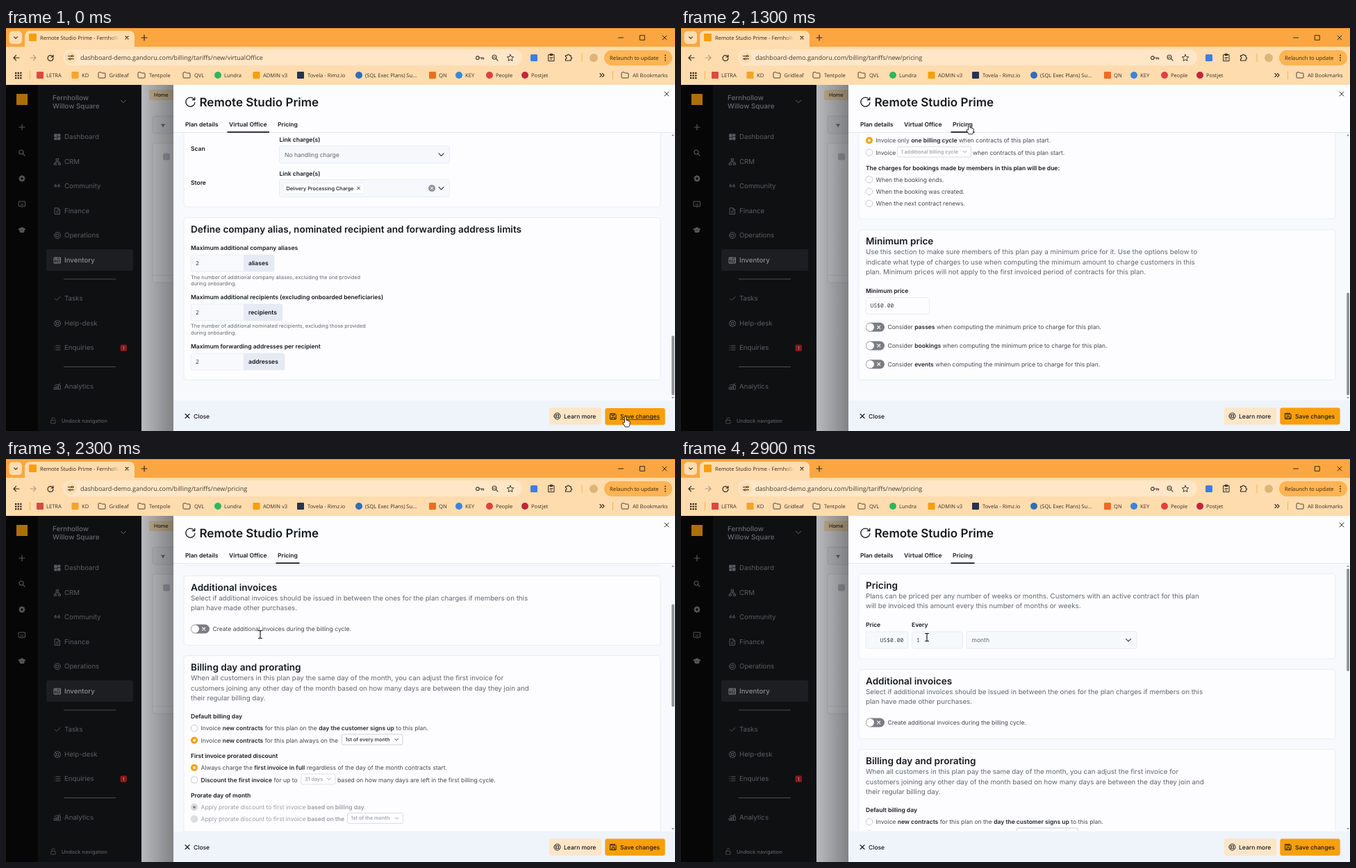
These frames come from a looping animation (963x581 px, 3000 ms). An HTML page with a canvas:

```html
<!DOCTYPE html>
<html lang="en">
<head>
<meta charset="utf-8">
<title>Remote Studio Prime</title>
<style>
html, body { margin: 0; width: 100%; height: 100%; overflow: hidden; }
canvas { display: block; width: 963px; height: 581px; }
</style>
</head>
<body>
<canvas id="stage" width="963" height="581"></canvas>
<script>
const ctx = document.getElementById('stage').getContext('2d');
ctx.textRendering = 'geometricPrecision';
const LOOP = 3000, STEP = 100, MAX_SCROLL = 588;
const UI = 'Inter, sans-serif', CHROME = '"Open Sans", sans-serif', MONO = '"Noto Sans Mono", monospace';
const INK = '#17191e', BODY = '#45474d', SOFT = '#63666d', FAINT = '#9b9da3', AMBER = '#f99e0c', EDGE = '#e6e9f0';
const PEACH = '#ffdcae', THUMB = '#909297';

// ---- drawing helpers ----
function rect(x, y, w, h, fill, r = 0, edge) {
  ctx.beginPath();
  ctx.roundRect(x, y, w, h, r);
  if (fill) { ctx.fillStyle = fill; ctx.fill(); }
  if (edge) { ctx.strokeStyle = edge; ctx.lineWidth = 0.8; ctx.stroke(); }
}
function disc(x, y, r, fill, edge, width = 1) {
  ctx.beginPath();
  ctx.arc(x, y, r, 0, 7);
  if (fill) { ctx.fillStyle = fill; ctx.fill(); }
  if (edge) { ctx.strokeStyle = edge; ctx.lineWidth = width; ctx.stroke(); }
}
function icon(path, x, y, color, width = 1, fill) {
  const p = new Path2D(path);
  ctx.save();
  ctx.translate(x, y);
  ctx.lineCap = ctx.lineJoin = 'round';
  if (fill) { ctx.fillStyle = fill; ctx.fill(p); }
  if (color) { ctx.strokeStyle = color; ctx.lineWidth = width; ctx.stroke(p); }
  ctx.restore();
}
// y is the middle of the capitals
function text(s, x, y, size = 8.53, color = INK, weight = 400, font = UI) {
  ctx.font = `${weight} ${size}px ${font}`;
  ctx.fillStyle = color;
  ctx.fillText(s, x, y + size * 0.36);
  return x + ctx.measureText(s).width;
}
// *starred* parts are bold
function rich(s, x, y, color = BODY) {
  s.split('*').forEach((part, i) => {
    x = text(part, x, y, 8.53, i % 2 && color === BODY ? '#24262b' : color, i % 2 ? 600 : 400);
  });
}
const lines = (rows, y, size = 9.74, gap = 14.6) => rows.forEach((s, i) => text(s, 266, y + i * gap, size, SOFT));
const heading = (s, y) => text(s, 266, y, 13.55, INK, 600);
const label = (s, y, x = 266) => text(s, x, y, 8.53, INK, 600);

const CROSS = 'M-3-3L3 3M3-3L-3 3', DOWN = 'M-3.5-1.7L0 1.8 3.5-1.7', SMALL_DOWN = 'M-2.3-1.1L0 1.2 2.3-1.1';
const SMALL_CROSS = 'M-2-2L2 2M2-2L-2 2', PLUS = 'M-4 0H4M0-4V4';
const FOLDER = 'M-5-3.2q0-1 1-1H-1L.2-3H4q1 0 1 1V3q0 1-1 1H-4q-1 0-1-1Z';
const RING = 'M-4.5 0a4.5 4.5 0 1 0 9 0a4.5 4.5 0 1 0-9 0M-2 0a2 2 0 1 0 4 0a2 2 0 1 0-4 0M-3.2-3.2L-1.5-1.5M3.2-3.2L1.5-1.5M-3.2 3.2L-1.5 1.5M3.2 3.2L1.5 1.5';
const SEARCH = 'M-4-1a3 3 0 1 0 6 0a3 3 0 1 0-6 0M1.2 1.2L4 4';

// ---- motion ----
function at(keys, t) {
  const i = keys.findLastIndex(k => k[0] <= t);
  const a = keys[i], b = keys[i + 1] || a;
  const f = b === a ? 0 : (t - a[0]) / (b[0] - a[0]);
  return a.slice(1).map((v, j) => typeof v === 'number' ? v + (b[j + 1] - v) * f : v);
}
const POINTER = [
  [0, 892, 560, 'hand'], [600, 889, 556, 'hand'], [700, 852, 518, 'arrow'], [900, 640, 318, 'arrow'],
  [1100, 438, 160, 'arrow'], [1200, 415, 138, 'hand'], [1400, 415, 138, 'hand'], [1500, 408, 145, 'arrow'],
  [1600, 398, 153, 'arrow'], [1800, 370, 192, 'arrow'], [1900, 360, 208, 'arrow'], [2000, 360, 208, 'arrow'],
  [2100, 364, 218, 'blocked'], [2200, 366, 253, 'beam'], [2600, 366, 253, 'beam'], [2900, 354, 257, 'beam']
];
const SCROLL = [
  [0, MAX_SCROLL], [2000, MAX_SCROLL], [2100, 528], [2200, 310], [2300, 135],
  [2400, 66], [2500, 30], [2600, 12], [2700, 2], [2800, 0]
];

// ---- browser ----
function bookmark(s, iconX, textX, color, round) {
  if (!color) icon(FOLDER, iconX, 68, '#4d4234', 1);
  else if (round) disc(iconX, 68, 5, color);
  else rect(iconX - 5, 63, 10, 10, color, 1);
  text(s, textX, 68, 7.6, '#3a3026', 400, CHROME);
}
function browser(page) {
  const dark = '#33291d';
  rect(0, 0, 963, 40, '#fba640');
  rect(0, 0, 963, 1, '#dd8f33');
  rect(0, 27, 963, 55, PEACH);
  rect(27, 4, 158, 30, PEACH, 7);
  rect(4.5, 4.5, 18.5, 18.5, PEACH, 5);
  icon(SMALL_DOWN, 14, 14, dark, 1.2);
  rect(33, 8, 11, 11, AMBER, 1);
  ctx.save();
  ctx.beginPath();
  ctx.rect(48, 4, 114, 22);
  ctx.clip();
  text('Remote Studio Prime - Fernhollow', 49, 14, 7.6, dark, 400, CHROME);
  ctx.restore();
  const fade = ctx.createLinearGradient(148, 0, 163, 0);
  fade.addColorStop(0, PEACH + '00');
  fade.addColorStop(1, PEACH);
  rect(148, 6, 15, 18, fade);
  icon(SMALL_CROSS, 174, 14, dark, 1.1);
  icon(PLUS, 199, 14, dark, 1.2);
  icon('M-3.5 0H3.5', 885, 14, dark);
  icon('M-3.3-3.3H3.3V3.3H-3.3Z', 916, 14, dark);
  icon(CROSS, 948, 14, dark);

  icon('M4 0H-4M-.5-3.7L-4 0-.5 3.7', 15, 43, dark, 1.2);
  icon('M-4 0H4M.5-3.7L4 0 .5 3.7', 39, 43, '#b3987a', 1.2);
  icon('M3.2-2A4 4 0 1 0 4 .6M4-4V-1.2H1', 64, 43, dark, 1.2);
  rect(82, 31, 661, 23, '#fee6c7', 11.5);
  disc(93.5, 42.5, 8.5, PEACH);
  icon('M-4-2H0M3.5-2H4M-4 2H-3M.5 2H4M.5-2a1.3 1.3 0 1 0 2.6 0a1.3 1.3 0 1 0-2.6 0M-2.6 2a1.3 1.3 0 1 0 2.6 0a1.3 1.3 0 1 0-2.6 0', 93.5, 42.5, dark);
  text('dashboard-demo.gandoru.com/billing/tariffs/new/' + page, 107, 43, 9.03, '#4a3d2d', 400, CHROME);
  icon('M-5.5 0a2.3 2.3 0 1 0 4.6 0a2.3 2.3 0 1 0-4.6 0M-1 0H5.5V2M3 0V2', 682, 43, '#4a3d2d', 1.2);
  icon(SEARCH + 'M-2.3-1H.3', 704, 43, '#4a3d2d', 1.1);
  icon('M0-4.8L1.4-1.6 4.8-1.3 2.2 1 3 4.4 0 2.6-3 4.4-2.2 1-4.8-1.3-1.4-1.6Z', 726, 43, '#4a3d2d');
  rect(755, 38, 10, 10, '#3f7de0', 1.5);
  icon('M-4-4H4V5H-4ZM-1.5-5.3H1.5V-3H-1.5ZM-2 0H2M-2 2.3H1', 785, 42.5, dark);
  icon('M-4-2.5H-1.5a1.5 1.5 0 1 1 3 0H3.5V0a1.5 1.5 0 1 1 0 3V5H-4V2.5a1.5 1.5 0 1 0 0-3Z', 809.5, 42, dark, 1.2);
  rect(828.5, 37, 1, 12, '#f5b254');
  disc(846, 43, 6, '#dfb478');
  rect(861, 32, 98, 22, '#fcb454', 11);
  text('Relaunch to update', 869, 43, 7.75, '#3b2708', 400, CHROME);
  [39.5, 43, 46.5].forEach(y => disc(949, y, 0.9, dark));

  for (let i = 0; i < 9; i++) rect(13 + i % 3 * 3.6, 63.8 + Math.floor(i / 3) * 3.6, 2.3, 2.3, dark);
  rect(34, 62, 1, 12, '#f5b254');
  rect(873, 62, 1, 12, '#f5b254');
  bookmark('LETRA', 49, 58, '#db4b3f');
  bookmark('KD', 99.5, 109, '#f5a32a');
  bookmark('Gridleaf', 138, 148.5);
  bookmark('Tentpole', 195, 206);
  bookmark('QVL', 260, 271);
  bookmark('Lundra', 305, 314, '#2fb65c', true);
  bookmark('ADMIN v3', 360.5, 370, AMBER);
  bookmark('Tovela - Rimz.io', 424, 434, '#26334f');
  bookmark('(SQL Exec Plans) Su...', 508, 517, '#2f6fb7', true);
  bookmark('QN', 614, 623, '#f36a22');
  bookmark('KEY', 652, 661, '#3d86d8', true);
  bookmark('People', 696, 705, '#e0413f', true);
  bookmark('Postjet', 747, 756, '#c2263a', true);
  icon('M-3-2.5L-.5 0-3 2.5M.5-2.5L3 0 .5 2.5', 858, 68, dark, 1.1);
  bookmark('All Bookmarks', 891, 902);
}

// ---- dimmed page behind the drawer ----
const MENU = [
  ['Dashboard', 157, 'M-4-4H-.8V0H-4ZM.8-4H4V-1.5H.8ZM.8 0H4V4H.8ZM-4 1.5H-.8V4H-4Z'],
  ['CRM', 193, 'M-1.5-4.5H1.5V-2H-1.5ZM0-2V0M-3 2V0H3V2M-4.5 2H-1.7V4.3H-4.5ZM1.7 2H4.5V4.3H1.7Z'],
  ['Community', 228, 'M-4 0a1.4 1.4 0 1 0 2.8 0a1.4 1.4 0 1 0-2.8 0Q-4-2.5-2-3M.8 0a1.4 1.4 0 1 0 2.8 0a1.4 1.4 0 1 0-2.8 0Q.8-2.5 2.8-3'],
  ['Finance', 264, 'M-3.5-4.5H1L3.5-2V4.5H-3.5ZM-1.5 0H1.5M-1.5 2.2H1.5M1-4.5V-2H3.5'],
  ['Operations', 299, 'M-4.5 0a4.5 4.5 0 1 0 9 0a4.5 4.5 0 1 0-9 0M-1.8-1.8H1.8V1.8H-1.8Z'],
  ['Inventory', 335, 'M-4.5-4H4.5V4H-4.5ZM-4.5-1.8H4.5M-2-4V4M0 0H3M0 2H3'],
  ['Tasks', 390, 'M-3.5 0L-1 2.5 4-2.5'],
  ['Help-desk', 426, RING],
  ['Enquiries', 461, 'M-2-3H4M-2 0H4M-2 3H4M-4.2-3H-4M-4.2 0H-4M-4.2 3H-4'],
  ['Analytics', 517, 'M-4.5 4H-2V1H-4.5ZM-1 4H1V0H-1ZM2 4H4.3V-2H2ZM-4-1.5L-1-3 1-2.5 4-4.5']
];
function backdrop() {
  rect(0, 82, 46, 499, '#060607');
  rect(46, 82, 149, 499, '#0f1012');
  rect(15, 95, 16, 16, '#ad6f0c');
  const rail = '#56575b';
  icon(PLUS, 23, 143, rail, 1.2);
  icon(SEARCH, 23, 180, rail, 1.1);
  disc(23, 217, 2.8, null, rail, 2.2);
  for (let a = 0; a < 8; a++) disc(23 + 4.1 * Math.cos(a * Math.PI / 4), 217 + 4.1 * Math.sin(a * Math.PI / 4), 0.8, rail);
  icon('M-4.5-4H4.5V3H1L0 4.5-1 3H-4.5ZM-1.5-1V-.8M1.5-1V-.8M-1.5 1H1.5', 23, 254, rail);
  icon('M-5-1L0-3.5 5-1 0 1.5ZM-3 .5V3Q0 4.5 3 3V.5', 23, 291, rail, 1, rail);

  text('Fernhollow', 67, 100, 9.9, '#66676a', 500);
  text('Willow Square', 67, 112, 9.9, '#66676a', 500);
  icon(DOWN, 169, 106, '#66676a');
  rect(58, 319, 125, 31, '#1d1e21', 3);
  for (const [name, y, path] of MENU) {
    const on = name === 'Inventory', color = on ? '#8d8e90' : '#5b5c5f';
    icon(path, 74, y, color, 0.9, name === 'Dashboard' ? color : null);
    text(name, 84, y, 9.7, color, on ? 500 : 400);
  }
  rect(83, 361.5, 75, 1, '#4d4e50');
  rect(83, 488, 75, 1, '#4d4e50');
  rect(164.5, 456.5, 9.5, 9.5, '#87191b', 2);
  text('1', 167.8, 461.3, 6.8, '#a58f8f', 500);
  icon('M-3-.5H3V4H-3ZM-2-.5V-2.5a2 2 0 0 1 4 0', 68, 566, '#4b4c4f', 0.9);
  text('Undock navigation', 80, 566, 7.4, '#5b5c5f', 500);

  rect(195, 82, 46, 499, '#b9babd');
  rect(206, 89, 40, 15, '#bda98a', 2);
  text('Home', 213, 96.5, 7.3, '#24201a', 500);
  rect(211, 127, 40, 25, '#b4b6ba', 3, '#a2a4a9');
  icon('M-3.2-2H3.2L.8.7V2.2H-.8V.7Z', 226, 140.5, null, 1, '#5a5c61');
  rect(211, 166, 40, 201, '#bfc0c3', 3, '#a8a9ad');
  rect(226, 180.5, 10, 10, '#979aa2', 2);
  rect(211, 356, 40, 0.8, '#adafb3');
  const shade = ctx.createLinearGradient(195, 0, 241, 0);
  shade.addColorStop(0, '#0000');
  shade.addColorStop(1, 'rgba(0, 0, 0, 0.3)');
  rect(195, 82, 46, 499, shade);
}

// ---- form parts ----
const card = (y, bottom) => rect(256, y, 686, bottom - y, '#fdfdff', 4, EDGE);
const field = (x, y, w, h = 24) => rect(x, y, w, h, '#f6f8fc', 3, EDGE);
const money = (s, x, y) => text(s, x, y, 8.05, '#3d3f45', 400, MONO);
function picker(s, x, y, w) {
  field(x, y - 12.5, w, 25);
  text(s, x + 7.5, y, 8.53, SOFT);
  icon(DOWN, x + w - 12, y, '#33353a', 1.2);
}
function miniPicker(s, x, y, w, off) {
  rect(x, y - 7.5, w, 15, '#fdfdff', 2, off ? '#d3d6dc' : '#c3c6cd');
  text(s, x + 5, y - 0.3, 7.3, off ? FAINT : '#2a2c31', 500);
  icon(SMALL_DOWN, x + w - 9, y, off ? FAINT : '#2a2c31');
}
function radio(y, on, off) {
  if (off) {
    disc(271, y, 4.8, '#dcdee2', '#d0d2d7', 0.8);
    if (on) disc(271, y, 2, '#85878e');
  } else if (on) {
    disc(271, y, 5, AMBER);
    disc(271, y, 2, '#fff');
  } else disc(271, y, 4.8, '#fff', '#c0c3ca', 0.9);
}
function option(s, y, on, off) {
  radio(y, on, off);
  rich(s, 280.5, y, off ? FAINT : BODY);
}
function toggle(s, y) {
  rect(266, y - 6.5, 27, 13, '#7b7d83', 6.5);
  disc(272.3, y, 5.7, '#fff');
  icon(SMALL_CROSS, 284.7, y, '#fff', 1.1);
  rich(s, 297.5, y);
}
function limit(title, unit, y, w) {
  label(title, y);
  rect(266, y + 10, 76 + w, 24, '#f7f9fc', 3, EDGE);
  rect(342, y + 10, w, 24, '#e6eaf2', [0, 3, 3, 0]);
  money('2', 273, y + 22.5);
  label(unit, y + 21.5, 349);
}

function officeTab() {
  card(100, 258);
  label('Link charge(s)', 160.5, 393.5);
  label('Scan', 174);
  picker('No handling charge', 393.5, 182.5, 245);
  label('Link charge(s)', 209.5, 393.5);
  label('Store', 223);
  picker('', 393.5, 231, 245);
  rect(399, 223.5, 117, 15.5, '#fff', 2, EDGE);
  text('Delivery Processing Charge', 403.5, 231, 7.3, INK, 500);
  icon(SMALL_CROSS, 507.5, 231, '#33353a');
  disc(613, 231, 5, '#90939b');
  icon('M-1.6-1.6L1.6 1.6M1.6-1.6L-1.6 1.6', 613, 231, '#fff');
  card(273.5, 507.5);
  heading('Define company alias, nominated recipient and forwarding address limits', 290.5);
  limit('Maximum additional company aliases', 'aliases', 317, 44);
  lines(['The number of additional company aliases, excluding the one provided', 'during onboarding.'], 359, 7.3, 9.7);
  limit('Maximum additional recipients (excluding onboarded beneficiaries)', 'recipients', 388, 56);
  lines(['The number of additional nominated recipients, excluding those provided', 'during onboarding.'], 429.7, 7.3, 9.7);
  limit('Maximum forwarding addresses per recipient', 'addresses', 459, 59);
}

function pricingTab() {
  card(165.5, 288);
  heading('Pricing', 182.5);
  lines(['Plans can be priced per any number of weeks or months. Customers with an active contract for this plan',
    'will be invoiced this amount every this number of months or weeks.'], 197);
  label('Price', 238.5);
  label('Every', 238.5, 332);
  field(266, 249, 61);
  money('US$0.00', 286.5, 261);
  field(332.5, 249, 73);
  money('1', 339, 261);
  picker('month', 411, 261, 245);

  card(303.5, 403.5);
  heading('Additional invoices', 320.5);
  lines(['Select if additional invoices should be issued in between the ones for the plan charges if members on this',
    'plan have made other purchases.'], 335);
  toggle('Create additional invoices during the billing cycle.', 380);

  card(418.5, 863);
  heading('Billing day and prorating', 435.5);
  lines(['When all customers in this plan pay the same day of the month, you can adjust the first invoice for',
    'customers joining any other day of the month based on how many days are between the day they join and',
    'their regular billing day.'], 450.5);
  label('Default billing day', 506);
  option('Invoice *new contracts* for this plan on the *day the customer signs up* to this plan.', 523);
  option('Invoice *new contracts* for this plan always on the', 540.5, true);
  miniPicker('1st of every month', 483.5, 539.5, 87.5);
  label('First invoice prorated discount', 563);
  option('Always charge the *first invoice in full* regardless of the day of the month contracts start.', 580, true);
  option('*Discount the first invoice* for up to', 597.5);
  miniPicker('31 days', 425, 596.5, 49, true);
  rich('based on how many days are left in the first billing cycle.', 477, 597.5);
  label('Prorate day of month', 620);
  option('Apply prorate discount to first invoice *based on billing day*.', 637, true, true);
  option('Apply prorate discount to first invoice *based on the*', 654, false, true);
  miniPicker('1st of the month', 491.5, 653, 80, true);
  label('Last invoice prorated discount', 677);
  option('Always *charge last invoice in full* regardless of the day of the month the contract ends.', 694, true, true);
  option('*Discount the last invoice* based on the day members leave contracts for this plan.', 711, false, true);
  label('Advance payments', 733);
  option('Invoice only *one billing cycle* when contracts of this plan start.', 750, true);
  option('Invoice', 767.5);
  miniPicker('1 additional billing cycle', 311.5, 766.5, 106, true);
  rich('when contracts of this plan start.', 420, 767.5);
  label('The charges for bookings made by members in this plan will be due:', 790);
  ['ends', 'was created'].forEach((s, i) => option(`When the booking ${s}.`, 806.5 + i * 17.2));
  option('When the next contract renews.', 841);

  card(879, 1095.5);
  heading('Minimum price', 895.5);
  lines(['Use this section to make sure members of this plan pay a minimum price for it. Use the options below to',
    'indicate what type of charges to use when computing the minimum amount to charge customers in this',
    'plan. Minimum prices will not apply to the first invoiced period of contracts for this plan.'], 910.7);
  label('Minimum price', 966.5);
  rect(266, 976.5, 91.5, 24, '#fdfdff', 3, EDGE);
  money('US$0.00', 272.5, 988.5);
  ['passes', 'bookings', 'events'].forEach((s, i) =>
    toggle(`Consider *${s}* when computing the minimum price to charge for this plan.`, 1019.3 + i * 26.7));
}

function drawer(pricing, scroll, hover) {
  rect(241, 82, 722, 499, '#f8f9fc');
  ctx.save();
  ctx.beginPath();
  ctx.rect(241, 151, 722, 385);
  ctx.clip();
  if (pricing) {
    ctx.translate(0, -scroll);
    pricingTab();
  } else officeTab();
  ctx.restore();

  const thumb = pricing ? [158 + scroll * 0.38, 148] : [443.5, 86];
  rect(958.2, thumb[0], 3.8, thumb[1], THUMB, 1.9);
  icon('M-2 1L0-1.5 2 1Z', 960, 154.5, null, 1, THUMB);
  icon('M-2-1L0 1.5 2-1Z', 960, 533, null, 1, THUMB);

  rect(241, 82, 722, 68, '#fdfdff');
  rect(241, 150, 722, 1, '#e3e6ec');
  icon('M5.6-3.4A6.6 6.6 0 1 0 6.6 1M6.4-6.4V-2.8H2.8', 265.3, 106.5, INK, 1.3);
  text('Remote Studio Prime', 278.5, 107, 17, INK, 600);
  icon(CROSS, 951, 95, '#33353a');
  label('Plan details', 139, 258);
  label('Virtual Office', 139, 321);
  label('Pricing', 139, 391);
  if (pricing) rect(388.5, 149.3, 34, 1.7, INK);
  else rect(318.5, 149.3, 60.5, 1.7, INK);

  rect(241, 537, 722, 44, '#eff3fa');
  icon(CROSS, 261, 559.5, INK, 1.1);
  text('Close', 270, 559.5, 8.53, INK, 500);
  rect(781.7, 547.4, 75.6, 24.3, '#fce6c8', 3);
  icon(RING, 793.5, 559.5, INK);
  text('Learn more', 803, 559.5, 8.53, INK, 500);
  const y = hover ? 560 : 559.5;
  rect(862.3, y - 12.1, 86.4, 24.3, AMBER, 3);
  icon('M-4-4H2.5L4-2.5V4H-4ZM-2-4V-1.5H1.5V-4M-2 4V1H2V4', 874, y, INK);
  const end = text('Save changes', 884, y, 8.53, INK, 500);
  if (hover) rect(884, y + 4.3, end - 884, 0.8, INK);
}

function pointer(x, y, shape) {
  if (shape === 'hand') {
    icon('M-1.4 8.5V1.2a1.2 1.2 0 0 1 2.4 0V5.5l4 1.2q1.5.5 1.3 2l-.6 4-1 2.3H-.7l-3.2-5q-.4-1.6 1-1.5Z', x, y, '#111', 0.9, '#fff');
  } else if (shape === 'arrow') {
    icon('M0 0V10.5L2.5 8.3 4 12 5.7 11.2 4.2 7.7H7.5Z', x, y, '#111', 0.8, '#fff');
  } else if (shape === 'blocked') {
    disc(x, y, 4.6, '#fff8', '#b81f24', 1.6);
    icon('M-3.2-3.2L3.2 3.2', x, y, '#b81f24', 1.6);
  } else {
    icon('M-2.5-5.5H-.7L0-5 .7-5.5H2.5M0-5V5M-2.5 5.5H-.7L0 5 .7 5.5H2.5', x, y, '#111', 1.1);
  }
}

function draw(now) {
  const t = Math.floor(now % LOOP / STEP) * STEP;
  const pricing = t >= 1300;
  browser(pricing ? 'pricing' : 'virtualOffice');
  backdrop();
  drawer(pricing, at(SCROLL, t)[0], t < 700);
  pointer(...at(POINTER, t));
}
let start;
function tick(now) {
  start ??= now;
  draw(now - start);
  requestAnimationFrame(tick);
}
draw(0);
requestAnimationFrame(tick);
</script>
</body>
</html>
```
